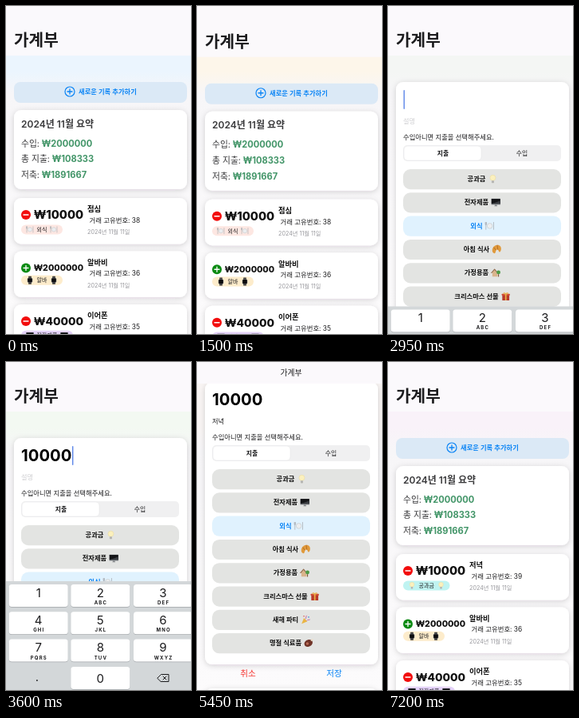
Write an HTML page that moves like this. It is 232 by 410 pixels and loops after 7.25 s.

```html
<!DOCTYPE html>
<html lang="ko">
<head>
<meta charset="utf-8">
<title>가계부</title>
<style>
html, body { margin: 0; width: 100%; height: 100%; overflow: hidden; background: #fff; }
svg { display: block; width: 100vw; height: 100vh; font-family: Inter, "Noto Sans CJK KR", sans-serif; }
text { white-space: pre; }
</style>
</head>
<body>
<svg id="stage" viewBox="0 0 232 410" xmlns="http://www.w3.org/2000/svg">
  <defs>
    <filter id="shadow" x="-10%" y="-20%" width="120%" height="150%">
      <feDropShadow dx="0" dy="1.5" stdDeviation="3.5" flood-color="#201020" flood-opacity=".17"/>
    </filter>
    <linearGradient id="sky" x1="0" y1="0" x2="0" y2="1">
      <stop id="tintA" offset=".15"/>
      <stop id="tintB" offset=".2"/>
      <stop offset=".27" stop-color="#f7f6f8"/>
      <stop offset="1" stop-color="#fcfbfc"/>
    </linearGradient>
    <clipPath id="formClip"><rect id="formBox" x="10" y="95" width="217"/></clipPath>
  </defs>
  <rect width="232" height="410" fill="url(#sky)"/>
  <g id="scene"></g>
</svg>
<script>
const LOOP = 7250, STEP = 50, PITCH = 66.5;
const BLUE = '#0a84f5', INK = '#1c1c1e';
const $ = id => document.getElementById(id);
const pen = document.createElement('canvas').getContext('2d');

// ---------- timing ----------
const smooth = u => u * u * (3 - 2 * u);
function track(t, keys) {
  if (t <= keys[0][0]) return keys[0][1];
  for (let i = 1; i < keys.length; i++) {
    const [a, from] = keys[i - 1], [b, to] = keys[i];
    if (t < b) return from + (to - from) * smooth((t - a) / (b - a));
  }
  return keys.at(-1)[1];
}
const latest = (t, keys) => keys.reduce((v, [at, next]) => t >= at ? next : v, '');

const scrollKeys = [[300, 0], [700, 80], [900, 80], [1350, -5], [1600, 0],
  [5200, 0], [5750, 162], [6500, 162], [6900, 0]];
const openKeys = [[2400, 0], [2800, 1], [6500, 1], [6850, 0]];
const boardKeys = [[2850, 0], [3150, 1], [4900, 1], [5150, 0]];
const pressKeys = [[2250, 1], [2350, .6], [2500, .3]];
const amountKeys = [[3200, '1'], [3300, '10'], [3380, '100'], [3460, '1000'], [3540, '10000']];
const noteKeys = [[4000, 'ㅈ'], [4150, '저'], [4300, '전'], [4450, '저녀'], [4600, '저녁']];
const tints = [[0, [235, 245, 254]], [1500, [253, 246, 234]], [2350, [244, 244, 245]],
  [3600, [243, 249, 242]], [4800, [251, 246, 240]], [6100, [246, 243, 247]], [7200, [249, 242, 249]]];

// ---------- drawing helpers ----------
const measure = (s, size, weight = 400) => {
  pen.font = `${weight} 100px Inter, "Noto Sans CJK KR", sans-serif`;
  return pen.measureText(s).width * size / 100;
};
const text = (x, y, size, s, fill = INK, weight = 400, anchor = 'start', extra = '') =>
  `<text x="${x}" y="${y}" font-size="${size}" fill="${fill}" font-weight="${weight}" text-anchor="${anchor}" ${extra}>${s}</text>`;
const mid = (x, y, size, s, fill, weight, extra) => text(x, y, size, s, fill, weight, 'middle', extra);
const rect = (x, y, w, h, r, fill, extra = '') =>
  `<rect x="${x}" y="${y}" width="${w}" height="${h}" rx="${r}" fill="${fill}" ${extra}/>`;
const circle = (x, y, r, fill, extra = '') => `<circle cx="${x}" cy="${y}" r="${r}" fill="${fill}" ${extra}/>`;
const path = (d, fill = 'none', stroke = 'none', width = 1) =>
  `<path d="${d}" fill="${fill}" stroke="${stroke}" stroke-width="${width}" stroke-linecap="round" stroke-linejoin="round"/>`;
const group = (x, y, body, opacity = 1) => `<g transform="translate(${x} ${y})" opacity="${opacity}">${body}</g>`;
const card = (y, h) => rect(10, y, 217, h, 9, '#fff', 'filter="url(#shadow)"');

// Small pictograms, each centred on the origin and about 10 units wide
const icons = {
  plate: circle(0, 0, 3, '#eceef0', 'stroke="#c3c8cc" stroke-width=".6"') +
    path('M-4.4-4V4M4.4-4V4M-5-4v2.5h1.2V-4', 'none', '#a9aeb3', .7),
  watch: rect(-2.1, -5.5, 4.2, 11, .6, '#3c3c3e') + rect(-3.6, -3.4, 7.2, 6.8, 1.8, '#8b8b8e') +
    rect(-3.1, -2.9, 6.2, 5.8, 1.4, '#0c0c0e'),
  screen: rect(-5.2, -4.3, 10.4, 7, .4, '#8c8f94') + rect(-5, -4.1, 10, 5.6, 0, '#131417') +
    path('M-5 1.5L5-2V1.5z', '#3a3d42') + path('M-1 2.7h2l.7 1.6h-3.4z', '#808387'),
  bulb: circle(0, -1.4, 3.2, '#fbf0bd', 'stroke="#e8d9a0" stroke-width=".5"') + rect(-1.4, 1.8, 2.8, 2.8, .7, '#b5b5b2'),
  bread: path('M-5 1.5C-5-3-1-6 3-4.5 6-3 5.500 2 3.500 3 2 3 2.500 0 .5.2-1.500.5-.5 4-2.500 4.500-4 4.500-5 3-5 1.500z', '#e09a3c') +
    path('M-3-2l1.800 2.600M.7-4.600L1.300 0', 'none', '#a9611d', .7),
  house: path('M-5 0L-1.5-4 2 0v4.4h-6V0z', '#d9b48c') + path('M-5 0L-1.5-4 2 0', 'none', '#8f6a4c', 1) +
    circle(3, -.5, 2.2, '#4e9c46') + rect(2.5, 1.5, 1, 3, 0, '#7c5433'),
  gift: rect(-4, -1.5, 8, 6.2, .5, '#b8392a') + rect(-4.6, -2.8, 9.2, 2, .5, '#cf4a34') +
    rect(-.8, -2.8, 1.6, 7.5, 0, '#e9b048') + path('M0-3C-4-6-3-1 0-3 3-1 4-6 0-3', 'none', '#e9b048', .9),
  party: path('M-4.6 4.6L-2-2 2 2z', '#eab544') + path('M0-1C1-2 0-4 1-4.6M1.5 1C3-1 3 1 4.6 0', 'none', '#c2549b', .8) +
    circle(3.4, -3, .8, '#4a93d8') + circle(-2, -4, .7, '#dd4b3e'),
  meat: path('M-5 1C-5-3 0-5 3-3.500 6-1 4 3 0 4-2 4.600-4.500 4-5 1z', '#6f3327') +
    circle(-1.5, .6, 1.6, '#b86a55') + path('M3-3L4.6-4.2', 'none', '#eee0cc', 1.4),
};
const icon = (name, x, y, k = 1) => `<g transform="translate(${x} ${y}) scale(${k})">${icons[name]}</g>`;

// ---------- content ----------
const entry = (amount, name, id, tag, pic, fill, income = false) => ({ amount, name, id, tag, pic, fill, income });
const lunch = entry(10000, '점심', 38, '외식', 'plate', '#fde7e2');
const dinner = entry(10000, '저녁', 39, '공과금', 'bulb', '#bff3f1');
const others = [
  entry(2000000, '알바비', 36, '알바', 'watch', '#fdeccb', true),
  entry(40000, '이어폰', 35, '전자제품', 'screen', '#e4d2f8'),
  entry(5000, '음료수', 33, '외식', 'plate', '#fde7e2'),
];
const categories = [['공과금', 'bulb'], ['전자제품', 'screen'], ['외식', 'plate'], ['아침 식사', 'bread'],
  ['가정용품', 'house'], ['크리스마스 선물', 'gift'], ['새해 파티', 'party'], ['명절 식료품', 'meat']];

// The amount shrinks to its column, and the tag follows its height
function entryCard(e) {
  const won = '₩' + e.amount;
  const size = Math.min(18, 62.5 / measure(won, 1, 800));
  const w = 39 + 6.5 * e.tag.length;
  const tagY = 33.5 + (size - 14.7) * .8;
  return card(0, 57.5) +
    circle(25, 21, 6, e.income ? '#0b8a12' : '#f20d0d') +
    path('M22 21h6' + (e.income ? 'M25 18v6' : ''), 'none', '#fff', 1.3) +
    text(34.7, 21 + size * .36, size, won, '#111', 800) +
    rect(19, tagY, w, 12, 6, e.fill) +
    icon(e.pic, 30, tagY + 6, .9) + icon(e.pic, 8 + w, tagY + 6, .9) +
    mid(19 + w / 2, tagY + 8.5, 7, e.tag) +
    text(102, 17.3, 9.3, e.name, '#111', 700) +
    text(104.5, 30.9, 8.4, '거래 고유번호: ' + e.id) +
    text(102, 45, 7.2, '2024년 11월 11일', '#98989d');
}

function summary(spent) {
  const row = (y, label, value) => text(19, y, 10.8, label, '#3a3a3c') +
    text(18.7 + measure(label + ' ', 10.8), y, 11.1, '₩' + value, '#429568', 700);
  return card(0, 99) + text(19, 21.5, 12, '2024년 11월 요약', '#3a3a3c', 600) +
    row(45.5, '수입:', 2000000) + row(65.4, '총 지출:', spent) + row(85.3, '저축:', 2000000 - spent);
}

const addButton = opacity => `<g opacity="${opacity}">` + rect(10, 95, 217, 26, 8, '#dbe9f6') +
  circle(80, 107, 6, 'none', `stroke="${BLUE}" stroke-width="1.2"`) + path('M77 107h6M80 104v6', 'none', BLUE, 1.3) +
  text(91, 109.8, 8.3, '새로운 기록 추가하기', BLUE, 600) + '</g>';

function form(t) {
  const amount = latest(t, amountKeys), note = latest(t, noteKeys);
  const chosen = t < 6250 ? '외식' : '공과금';
  const caret = (x, y, h) => rect(x, y, 1.4, h, .7, '#5c86e8');
  let out = text(19, 124, 20.3, amount, '#000', 700) +
    text(19, 147, 8.2, note || '설명', note ? INK : '#cfcfd2');
  if (t > 2850 && t < 3850) out += caret(19.5 + measure(amount, 20.3, 700), 105, 24);
  else if (t >= 3850 && t < 4900) out += caret(19.5 + measure(note, 8.2), 138, 12);
  out += text(19, 167, 8.3, '수입아니면 지출을 선택해주세요.') +
    rect(19, 174, 198, 20, 5, '#f0f0f1') + rect(20, 175, 97, 18, 4.5, '#fff', 'stroke="#e2e2e4" stroke-width=".5"') +
    mid(69, 186.7, 7.8, '지출', INK, 600) + mid(168, 186.7, 7.8, '수입');
  categories.forEach(([name, pic], i) => {
    const y = 204 + i * 29.3, on = name === chosen;
    const w = measure(name, 8.3, 700), x = 118 - (w + 14) / 2;
    out += rect(19, y, 198, 25.2, 9, on ? '#e0f2fe' : '#e3e4e2') +
      text(x, y + 15.1, 8.3, name, on ? BLUE : '#111', 700) + icon(pic, x + w + 9, y + 12.3, 1.1);
  });
  return out;
}

// ---------- keyboards ----------
const key = (x, y, w, h = 28, fill = '#fff') =>
  rect(x, y + .7, w, h, 3.5, '#a3a7ab') + rect(x, y, w, h, 3.5, fill);
const erase = (x, y) => path(`M${x - 7} ${y}l4.5-4.5h9.5v9h-9.5z`, 'none', INK, 1) +
  path(`M${x} ${y - 2}l4 4m0-4l-4 4`, 'none', INK, 1);

function numberPad() {
  const letters = ['', 'ABC', 'DEF', 'GHI', 'JKL', 'MNO', 'PQRS', 'TUV', 'WXYZ'];
  const cols = [40.7, 118.3, 197];
  let out = '';
  letters.forEach((s, i) => {
    const x = cols[i % 3], y = 278 + Math.floor(i / 3) * 34.3;
    out += key(x - 37, y, 74) + mid(x, y + 15.5, 15, i + 1) +
      mid(x + .6, y + 25, 6, s, INK, 700, 'letter-spacing="1.2"');
  });
  return out + key(81.3, 381, 74) + mid(118.3, 400.7, 15, '0') + mid(39, 399, 15, '.') + erase(197, 395);
}

function hangulBoard() {
  const gray = '#abb0ba';
  const line = (s, x0, y) => [...s].map((c, i) => {
    const x = x0 + i * 23.55;
    return key(x - 9.7, y, 19.4) + mid(x, y + 18.3, 12.5, c);
  }).join('');
  return line('ㅂㅈㄷㄱㅅㅛㅕㅑㅐㅔ', 12, 279) + line('ㅁㄴㅇㄹㅎㅗㅓㅏㅣ', 23.8, 313.5) + line('ㅋㅌㅊㅍㅠㅜㅡ', 47.3, 348) +
    key(2, 348, 26, 28, gray) + path('M15 356l-6 6.5h3.3v5.5h5.4v-5.5h3.3z', 'none', INK, 1) +
    key(207, 348, 26, 28, gray) + erase(220.5, 362) +
    key(2, 383, 26, 28, gray) + mid(15, 400.5, 9.5, '123') +
    key(31.5, 383, 26, 28, gray) + circle(44.5, 396.5, 6, 'none', `stroke="${INK}" stroke-width=".9"`) +
    path('M38.5 396.5h12M44.5 390.5v12M44.5 390.5q-6 6 0 12q6-6 0-12M40 393h9M40 400h9', 'none', INK, .7) +
    key(61, 383, 20) + rect(69, 389.5, 4, 8, 2, INK) +
    path('M67 395.5q0 4 4 4t4-4M71 399.5v3.5M69 403h4', 'none', INK, .9) +
    key(84.5, 383, 91) + mid(130, 400, 9.5, '스페이스') +
    key(179, 383, 54, 28, gray) + path('M212 393v4.5h-10m3-3l-3 3l3 3', 'none', INK, 1);
}

// ---------- frame ----------
function render(t) {
  const scroll = track(t, scrollKeys), open = track(t, openKeys), board = track(t, boardKeys);
  const shift = 348 * open;
  const saved = t >= 6500;
  const lead = track(t, [[1850, 1], [2200, 0], [6500, 0], [6850, 1]]);
  const spent = t < 1850 || saved ? 108333 : 98333;
  const tint = [0, 1, 2].map(c => Math.round(track(t, tints.map(([at, rgb]) => [at, rgb[c]]))));
  const color = `rgb(${tint})`;
  $('tintA').setAttribute('stop-color', color);
  $('tintB').setAttribute('stop-color', color);
  $('formBox').setAttribute('height', 26 + 327 * open);

  let body = '';
  if (open < 1) body += addButton((1 - open) * (saved ? 1 : track(t, pressKeys)));
  if (open > 0) {
    body += `<g opacity="${Math.min(1, open * 2)}">` + card(95, 26 + 327 * open) +
      `<g clip-path="url(#formClip)">${form(t)}</g></g>` +
      group(0, shift - 348, mid(64, 462.7, 10.6, '취소', '#f5302c') + mid(172, 462.7, 10.6, '저장', BLUE), open);
  }
  body += group(0, 130 + shift, summary(spent));
  const top = 240 + shift;
  others.forEach((e, i) => body += group(0, top + PITCH * (i + lead), entryCard(e)));
  if (t < 2200) {
    const away = track(t, [[1650, 0], [2000, 1]]);
    if (away < 1) body += group(-232 * away, top, entryCard(lunch), 1 - away * .6);
  } else if (saved) body += group(0, top, entryCard(dinner), lead);

  const barHeight = Math.max(27, 62 - scroll);
  const collapsed = Math.min(1, Math.max(0, (scroll - 24) / 14));
  let out = group(0, -scroll, body) + rect(0, 0, 232, barHeight, 0, '#fbf9fc', 'fill-opacity=".97"');
  if (collapsed < 1) out += text(10, 50 - scroll, 20.2, '가계부', INK, 700, 'start', `opacity="${1 - collapsed}"`);
  if (collapsed > 0) out += mid(118, 17, 9.8, '가계부', INK, 500, `opacity="${collapsed}"`);
  if (board > 0) out += group(0, 137 * (1 - board),
    rect(0, 274, 232, 137, 0, '#d3d7d9') + (t < 3850 ? numberPad() : hangulBoard()));
  $('scene').innerHTML = out;
}

const start = performance.now();
let shown = -1;
function tick() {
  const t = Math.floor(((performance.now() - start) % LOOP) / STEP) * STEP;
  if (t !== shown) render(shown = t);
  requestAnimationFrame(tick);
}
tick();
</script>
</body>
</html>
```
